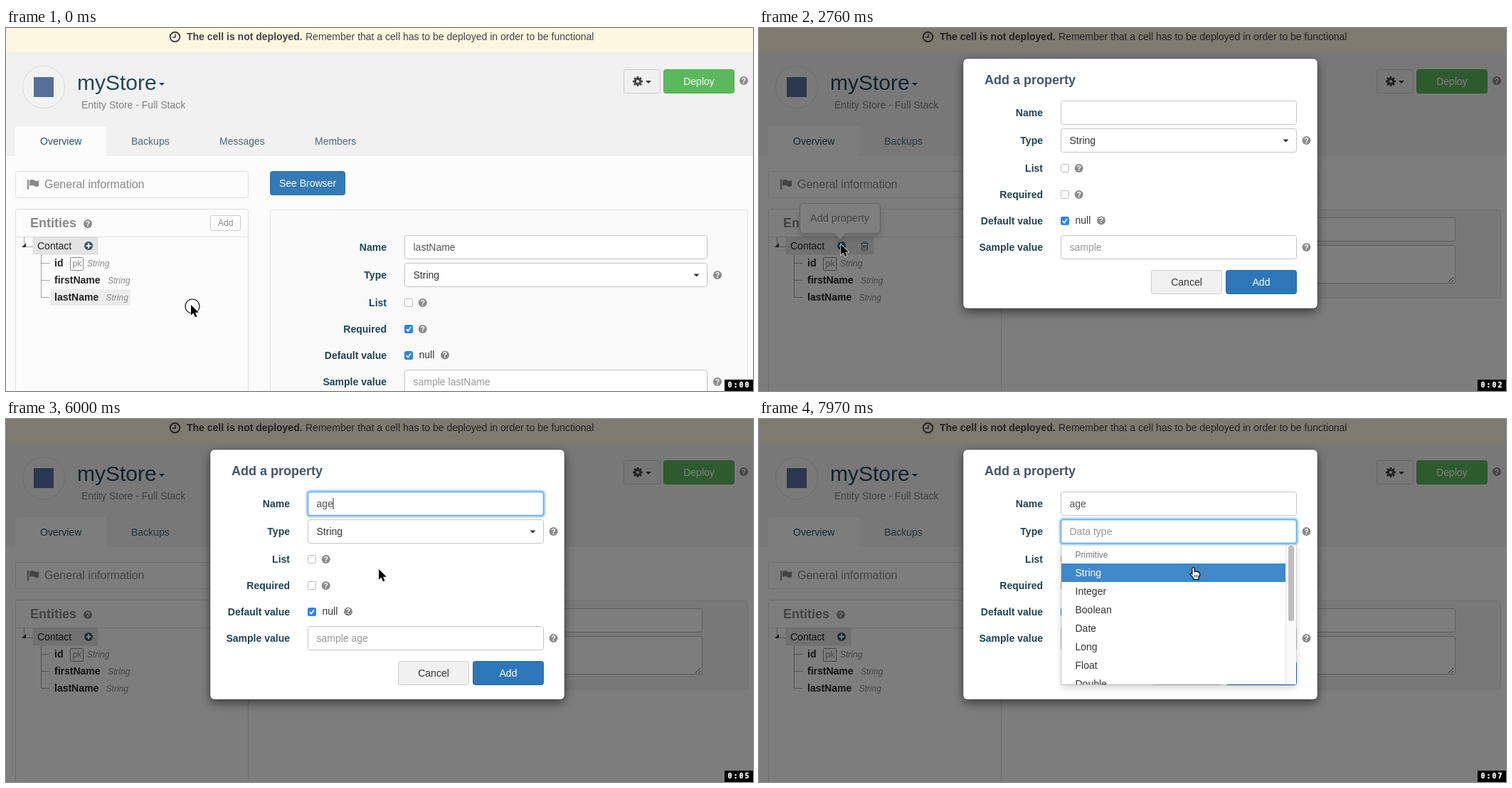
These frames come from a looping animation (1050 px wide and 510 px high, 8 s). An HTML page:

```html
<!DOCTYPE html>
<html lang="en">
<head>
<meta charset="utf-8">
<title>Add a property</title>
<style>
  html, body { margin: 0; width: 100%; height: 100%; overflow: hidden; background: #fcfcfc; }
  svg { display: block; width: 1050px; height: 510px; }
  text { font: 14px "Liberation Sans", Arial, sans-serif; white-space: pre; }
  .b { font-weight: bold; }
  .i { font-size: 12px; font-style: italic; }
  .s { font-size: 12px; }
  .h { font-size: 18px; font-weight: bold; }
  .m { text-anchor: middle; }
  .e { text-anchor: end; }
</style>
</head>
<body>
<svg id="stage" viewBox="0 0 1050 510" xmlns="http://www.w3.org/2000/svg"></svg>
<script>
const LOOP = 8000;
const INK = '#1f4353', GREY = '#888', BLUE = '#2d77b9';

// Drawing helpers: each returns SVG markup
const text = (x, y, str, fill, cls = '', attrs = '') =>
  `<text x="${x}" y="${y}" fill="${fill}" class="${cls}" ${attrs}>${str}</text>`;
const rect = (x, y, w, h, fill, attrs = '') =>
  `<rect x="${x}" y="${y}" width="${w}" height="${h}" fill="${fill}" ${attrs}/>`;
const box = (x, y, w, h, fill, stroke, r = 3, attrs = '') =>
  rect(x + .5, y + .5, w - 1, h - 1, fill, `stroke="${stroke}" rx="${r}" ${attrs}`);
const path = (d, fill, attrs = '') => `<path d="${d}" fill="${fill}" ${attrs}/>`;
const group = (id, body, attrs = '') => `<g id="${id}" ${attrs}>${body}</g>`;
const caretDown = (x, y, fill = '#333') => path(`M${x - 4} ${y}h8l-4 4z`, fill);
const help = (x, y) =>
  `<circle cx="${x}" cy="${y}" r="6" fill="#8b8b8b"/>` +
  text(x, y + 3.7, '?', '#fff', 'b m', 'style="font-size:10.5px"');
const button = (x, y, w, label, fill, stroke, color) =>
  box(x, y, w, 34, fill, stroke) + text(x + w / 2, y + 22, label, color, 'm');
const dots = (d) => path(d, 'none', 'stroke="#555" stroke-dasharray="1 1"');

function checkbox(x, y, on) {
  return on
    ? rect(x, y, 12, 12, '#2f83ef', 'rx="2.5"') +
      path(`M${x + 2.8} ${y + 6.2}l2.3 2.5 4-5.6`, 'none', 'stroke="#fff" stroke-width="1.7"')
    : box(x, y, 12, 12, '#fff', '#bbb', 2);
}

// Property form; (x, y) is the corner of its first input
function form(x, y, w, required, id = '') {
  const labels = [['Name', 22], ['Type', 61], ['List', 100], ['Required', 137],
    ['Default value', 174], ['Sample value', 211]];
  const field = (dy, name) => box(x, y + dy, w, 34, '#fff', '#c4c4c4', 3, `id="${id + name}Box"`);
  const right = x + w + (id ? 13.5 : 14);
  return labels.map(([label, dy]) => text(x - 25, y + dy, label, INK, 'b e')).join('') +
    field(0, 'name') + field(39, 'type') + field(189, 'sample') +
    text(x + 12.5, y + 22, id ? '' : 'lastName', '#555', '', `id="${id}name"`) +
    text(x + 12.5, y + 61, 'String', '#333', '', `id="${id}type"`) +
    group(id + 'typeCaret', caretDown(x + w - 15.5, y + 54.5)) +
    text(x + 12.5, y + 211, id ? '' : 'sample lastName', '#999', '', `id="${id}sample"`) +
    checkbox(x, y + 89, false) + checkbox(x, y + 126, required) + checkbox(x, y + 163, true) +
    text(x + 20.5, y + 173, 'null', '#333') +
    help(x + 25.7, y + 95) + help(x + 25.7, y + 132) + help(x + 57, y + 168.5) +
    help(right, y + 56) + help(right, y + 206);
}

function header() {
  const teeth = Array.from({ length: 8 }, (_, k) =>
    rect(886.6, 68, 2.8, 4, '#444', `transform="rotate(${k * 45} 888 75)"`)).join('');
  const tabs = [['Backups', 176], ['Messages', 300], ['Members', 434]];
  return rect(0, 0, 1050, 510, '#fcfcfc') + rect(0, 0, 1050, 180, '#f1f1f1') +
    rect(0, 0, 1050, 34, '#fbf7e0') +
    '<circle cx="237.5" cy="12.5" r="6.8" fill="none" stroke="#444" stroke-width="2"/>' +
    path('M238 8.5v4.5h-4', 'none', 'stroke="#444" stroke-width="1.6"') +
    text(254, 17, 'The cell is not deployed.', '#444', 'b') +
    text(421, 17, 'Remember that a cell has to be deployed in order to be functional', '#444') +
    '<circle cx="53" cy="83" r="29.5" fill="#f3f3f3" stroke="#dcdcdc"/>' +
    rect(39, 69, 28, 28, '#56709c') +
    text(100, 87, 'myStore', '#22475a', '', 'style="font-size:30px"') +
    caretDown(219, 77, '#22475a') +
    text(106, 113, 'Entity Store - Full Stack', '#808080') +
    box(868, 58, 52, 34, '#f0f0f0', '#ccc') + teeth +
    '<circle cx="888" cy="75" r="3.6" fill="none" stroke="#444" stroke-width="3"/>' +
    caretDown(903, 74) +
    button(924, 58, 100, 'Deploy', '#5cb85c', '#4cae4c', '#fff') + help(1037, 74) +
    path('M13 180v-39q0-3 3-3h122q3 0 3 3v39z', '#fcfcfc') +
    text(48, 164, 'Overview', '#2b5060') +
    tabs.map(([label, x]) => text(x, 164, label, '#4a6a78')).join('');
}

function sidebar() {
  const row = (y, name, typeX) =>
    text(68, y, name, '#222', 'b') + text(typeX, y, 'String', GREY, 'i');
  return box(13, 201, 328, 38, '#fcfcfc', '#dedede') +
    path('M31 213v14', 'none', 'stroke="#888" stroke-width="2"') +
    path('M33 214q4-2 7 0t6 0v8q-3 2-6 0t-7 0z', GREY) +
    text(54, 225, 'General information', GREY, '', 'style="font-size:16px"') +
    box(13, 254, 328, 270, '#fcfcfc', '#dedede') + rect(14, 293, 326, 1, '#dedede') +
    text(34, 280, 'Entities', GREY, 'h') + help(115, 275) +
    box(287, 263, 43, 22, '#fdfdfd', '#ccc', 2) + text(298, 278, 'Add', GREY, 's') +
    dots('M25.5 294v9M29 307.5h9M49.5 319v60M50 330.5h12M50 354.5h12M50 378.5h12') +
    path('M22 308h6v-6z', '#333') +
    rect(38, 294, 91, 24, '#e3e3e3', 'id="contact" stroke="#d8d8d8" stroke-width=".6"') +
    text(44, 311, 'Contact', '#222') +
    '<circle cx="116" cy="306" r="6" fill="#35586a"/>' +
    path('M116 302.5v7M112.5 306h7', 'none', 'stroke="#fff" stroke-width="2"') +
    group('trash', path('M143 302.5h11M146.500 302v-1.500h4v1.500M144.500 303v9h8v-9M146.500 305v5M148.500 305v5M150.500 305v5',
      'none', 'stroke="#587584"')) +
    rect(62, 367, 113, 23, '#ececec', 'id="lastRow"') +
    row(335, 'id', 114) + row(359, 'firstName', 143) + row(383, 'lastName', 140.5) +
    box(90, 322, 19, 19, 'none', GREY, 1) + text(93.5, 335, 'pk', GREY, 's') +
    group('tooltip',
      path('M63.500 246.500h101q6 0 6 6v30q0 6-6 6h-42l-8.500 8-8.500-8h-42q-6 0-6-6v-30q0-6 6-6z',
        '#fff', 'stroke="#c6c6c6" filter="url(#softShadow)"') +
      text(72, 272, 'Add property', GREY, '', 'style="font-size:14.5px"'));
}

function content() {
  return group('propertyPanel',
      button(371, 201, 106, 'See Browser', '#337ab7', '#2e6da4', '#fff') +
      box(371, 255, 672, 280, '#fafafa', '#e4e4e4') + form(560, 291, 426, true)) +
    group('entityPanel',
      box(371, 201, 417, 38, '#fcfcfc', '#dedede') +
      box(371, 255, 672, 125, '#f1f1f1', '#e2e2e2') +
      box(560, 266, 419, 34, '#fcfcfc', '#bbb') + box(560, 305, 419, 54, '#fcfcfc', '#bbb') +
      path('M969 357l7-7M973 357l3-3', 'none', 'stroke="#666"'));
}

function modal() {
  const options = ['String', 'Integer', 'Boolean', 'Date', 'Long', 'Float', 'Double'];
  const ring = (id, y) => group(id,
    box(423, y - 1, 334, 36, 'none', '#66afe9', 4, 'stroke-width="3" opacity=".75" filter="url(#glow)"') +
    box(424, y, 332, 34, 'none', '#5fabe8'));
  const menu =
    rect(425, 175, 330, 198, '#fff', 'stroke="#000" stroke-opacity=".18" filter="url(#softShadow)"') +
    text(444.500, 195, 'Primitive', '#777', 's') + rect(425, 203, 315, 26, '#3f88ca') +
    group('', options.map((name, k) =>
      text(444.500, 221 + 26 * k, name, k ? '#333' : '#fff')).join(''), 'clip-path="url(#menuClip)"') +
    rect(740, 176, 1, 197, '#e4e4e4') + rect(741, 176, 14, 197, '#fafafa') +
    rect(744, 178, 8, 106, '#bdbdbd', 'rx="4"');
  return group('modal',
    rect(0, 0, 1050, 510, '#000', 'opacity=".5"') +
    rect(287, 43, 498, 351, '#fff', 'rx="6" stroke="#000" stroke-opacity=".3" filter="url(#deepShadow)"') +
    text(317, 79, 'Add a property', '#44566b', 'h') +
    form(424, 102, 332, false, 'new-') +
    button(551, 340, 100, 'Cancel', '#f1f1f1', '#ccc', '#333') +
    button(656, 340, 100, 'Add', BLUE, '#2868a3', '#fff') +
    ring('nameRing', 102) + group('menu', menu) + ring('typeRing', 141) +
    rect(437, 111, 1, 16, '#222', 'id="nameCaret"') + rect(437, 150, 1, 16, '#222', 'id="typeTextCaret"'));
}

function pointers() {
  return '<circle id="click" r="10" fill="#fff" fill-opacity=".35" stroke="#111" stroke-width="1.2"/>' +
    group('arrow', path('M0 0v14.800l3.400-3.200 2.500 5.700 2.600-1.100-2.500-5.500h4.800z', '#000',
      'stroke="#fff" stroke-width="1.2" paint-order="stroke"')) +
    group('hand', path('M-1.600 9.500V1.600Q-1.600 0 0 0T1.600 1.600V6Q3 4.800 4.200 6 5.800 5.200 6.500 6.800 8.600 6.200 9 8.300V11.500L7.500 14V16.800H.2V15L-4.500 9.800Q-5 7.600-3 8.200Z',
      '#fff', 'stroke="#000" stroke-width="1.2"') +
      path('M2 10.500v3.500M4.200 10.500v3.500M6.400 10.500v3.500', 'none', 'stroke="#000" stroke-width=".8"')) +
    group('beam', path('M-3-7.500q3 0 3 2.500 0-2.500 3-2.500M0-5.500V5.500M-3 7.500q3 0 3-2.500 0 2.500 3 2.500M-2 2h4',
      'none', 'stroke="#222" stroke-width="1.200"'));
}

const shadow = (id, dy, blur, alpha) =>
  `<filter id="${id}" x="-20%" y="-20%" width="140%" height="150%">` +
  `<feDropShadow dx="0" dy="${dy}" stdDeviation="${blur}" flood-opacity="${alpha}"/></filter>`;

document.getElementById('stage').innerHTML =
  '<defs>' + shadow('softShadow', 4, 4, .18) + shadow('deepShadow', 5, 7, .5) +
  '<filter id="glow" x="-5%" y="-50%" width="110%" height="200%"><feGaussianBlur stdDeviation="1.3"/></filter>' +
  '<clipPath id="menuClip"><rect x="425" y="176" width="315" height="197"/></clipPath></defs>' +
  header() + content() + sidebar() + modal() + pointers() +
  rect(1010, 494, 40, 16, '#000') +
  text('1014.5 1022.5 1030.5 1038.5', 505, '', '#fff', 'b',
    'id="clock" stroke="#fff" stroke-width=".4" style="font:bold 10px \'DejaVu Sans Mono\',monospace"');

// Pointer poses, each held until the next: [time, x, y, shape]
const poses = [[0, 260, 389, 'arrow']];
for (let k = 1; k <= 7; k++) {
  const u = k / 7, p = u * u * (3 - 2 * u);
  poses.push([760 + 140 * k, 260 - 144 * p, 389 - 84 * p, k > 5 ? 'hand' : 'arrow']);
}
poses.push(
  [2760, 115, 304, 'arrow'],
  [5400, 135, 301, 'arrow'], [5550, 215, 284, 'arrow'], [5700, 330, 257, 'arrow'],
  [5850, 440, 231, 'arrow'], [6000, 524, 211, 'arrow'], [6140, 580, 190, 'arrow'],
  [6250, 615, 171, 'arrow'], [6390, 633, 159, 'hand'], [6530, 636, 156, 'hand'],
  [6680, 637, 154, 'hand'], [7120, 637, 157, 'beam'],
  [7820, 620, 188, 'arrow'], [7970, 610.5, 208.500, 'hand']);
const seconds = [1040, 2020, 3150, 4050, 5100, 6140, 7220];

const el = {};
document.querySelectorAll('[id]').forEach((node) => { el[node.id] = node; });
const show = (id, on) => el[id].setAttribute('visibility', on ? 'inherit' : 'hidden');
const within = (t, ...spans) => spans.some(([from, to]) => t >= from && t < to);

function render(t) {
  const [, x, y, shape] = poses.filter((pose) => pose[0] <= t).pop();
  for (const id of ['arrow', 'hand', 'beam']) {
    show(id, id === shape);
    el[id].setAttribute('transform', `translate(${x} ${y})`);
  }
  const offset = shape === 'beam' ? 0 : 2;
  el.click.setAttribute('cx', x + offset);
  el.click.setAttribute('cy', y + offset);
  show('click', within(t, [0, 150], [2470, 2610], [7120, 7370]));

  const open = t >= 2760, menuOpen = t >= 7120;
  const hover = within(t, [1600, 5550]);
  show('modal', open);
  show('propertyPanel', !open);
  show('entityPanel', open);
  show('lastRow', !open);
  show('trash', hover);
  show('tooltip', within(t, [1880, 5550]));
  el.contact.setAttribute('width', hover ? 123 : 91);

  const typed = 'age'.slice(0, t < 4650 ? 0 : 1 + Math.floor((t - 4650) / 150));
  el['new-name'].textContent = typed;
  el['new-sample'].textContent = 'sample ' + typed;
  el.nameCaret.setAttribute('x', typed ? 436.5 + Math.round(el['new-name'].getComputedTextLength()) : 437);
  show('nameRing', open && within(t, [2910, 7120]));
  show('nameCaret', open && within(t, [3150, 3750], [4200, 5550], [6000, 6530]));
  el['new-nameBox'].setAttribute('stroke', within(t, [7120, 7220]) ? '#a9c8e4' : '#c4c4c4');

  const typeHover = within(t, [6530, 7120]);
  el['new-typeBox'].setAttribute('fill', typeHover ? '#ececec' : '#fff');
  el['new-typeBox'].setAttribute('stroke', typeHover ? '#adadad' : '#c4c4c4');
  el['new-type'].textContent = menuOpen ? 'Data type' : 'String';
  el['new-type'].setAttribute('fill', menuOpen ? '#999' : '#333');
  show('new-typeCaret', !menuOpen);
  show('menu', menuOpen);
  show('typeRing', t >= 7220);
  show('typeTextCaret', within(t, [7120, 7820]));

  el.clock.textContent = '0:0' + seconds.filter((s) => s <= t).length;
}

function tick() {
  render(performance.now() % LOOP);
  requestAnimationFrame(tick);
}
tick();
</script>
</body>
</html>
```
